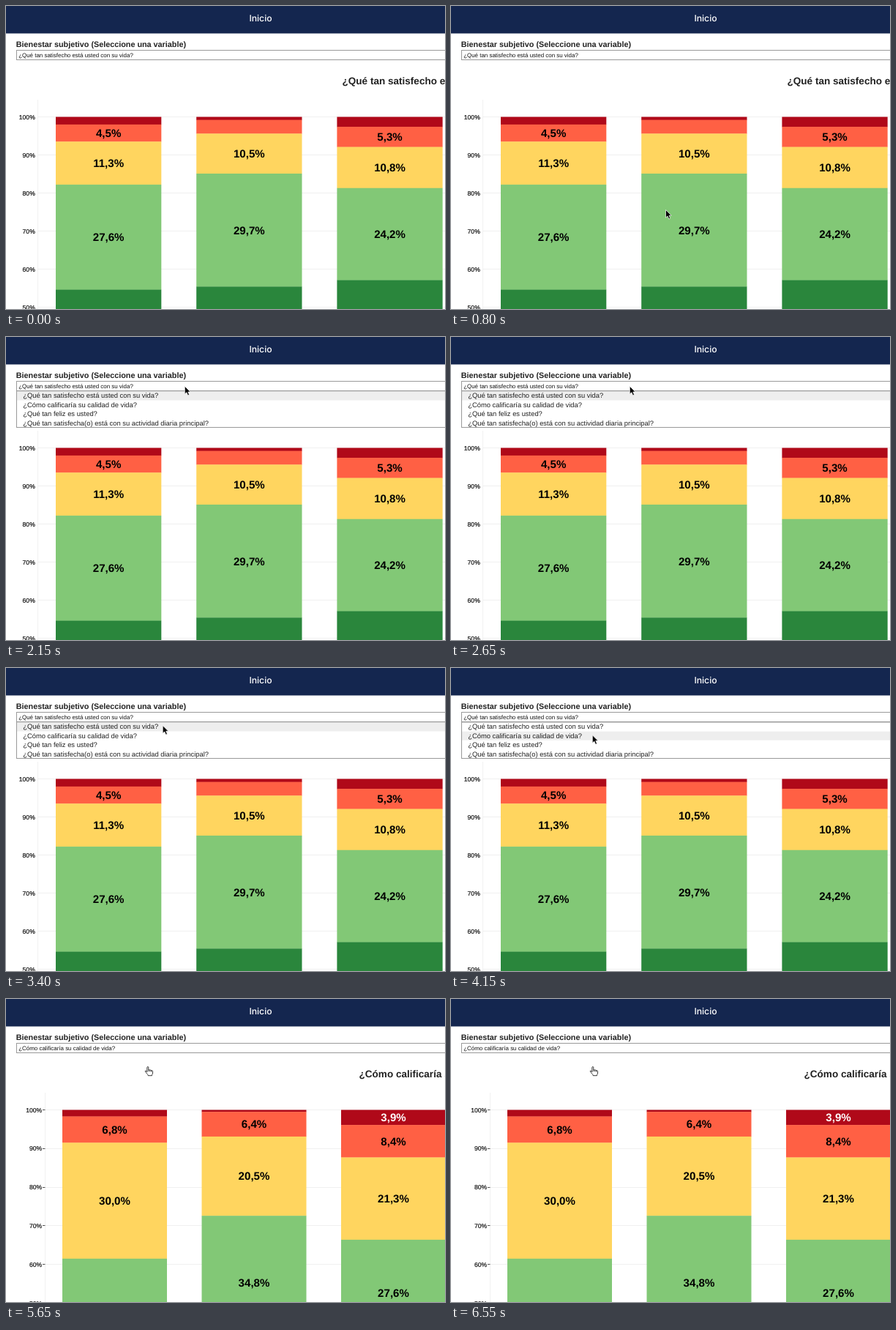
Animation of 600x414 px, one loop 6.6 s. Source, as an HTML page:

```html
<!DOCTYPE html>
<html lang="es">
<head>
<meta charset="utf-8">
<title>Bienestar subjetivo</title>
<style>
html, body { margin: 0; width: 100%; height: 100%; overflow: hidden; background: #fff; }
svg { display: block; width: 600px; height: 414px; }
text { font-family: "Liberation Sans", Arial, sans-serif; text-rendering: geometricPrecision; white-space: pre; }
.nav { font: 500 12.2px Inter, sans-serif; fill: #fff; text-anchor: middle; }
.head { font-size: 10.8px; font-weight: bold; fill: #222; }
.value { font-size: 7.95px; fill: #111; }
.option { font-size: 9.38px; fill: #222; }
.title { font-size: 13.55px; font-weight: bold; fill: #222; }
.axis { font-size: 8.6px; fill: #111; stroke: #111; stroke-width: .2px; text-anchor: end; }
.label { font-size: 15.1px; font-weight: bold; text-anchor: middle; }
</style>
</head>
<body>
<svg id="stage" viewBox="0 0 600 414"></svg>
<script>
const LOOP = 6600;
const HOVER = 1500, OPEN = 2150, NEXT_ROW = 3500, PICK = 4350, SWAP = 4900;
const TOP = 151.5;
const COLORS = ["#b00919", "#ff6044", "#ffd55f", "#82c876", "#2a863c"];
const QUESTIONS = [
  "¿Qué tan satisfecho está usted con su vida?",
  "¿Cómo calificaría su calidad de vida?",
  "¿Qué tan feliz es usted?",
  "¿Qué tan satisfecha(o) está con su actividad diaria principal?"
];
const CHARTS = [
  { title: QUESTIONS[0], titleX: 459.5, unit: 5.2, axisX: 43.5, labelX: 39.8, tick: 0,
    barX: 68, step: 192.2, width: 144.3,
    bars: [[2, 4.5, 11.3, 27.6], [.8, 3.6, 10.5, 29.7], [2.6, 5.3, 10.8, 24.2]] },
  { title: QUESTIONS[1], titleX: 482.5, unit: 5.28, axisX: 53.5, labelX: 49.2, tick: 3.5,
    barX: 77, step: 190.5, width: 143,
    bars: [[1.7, 6.8, 30, 46], [.5, 6.4, 20.5, 34.8], [3.9, 8.4, 21.3, 27.6]] }
];
// time, x, y of the pointer tip
const PATH = [
  [350, 330, 420], [1450, 241, 75], [1550, 237.5, 69.3], [2050, 244.3, 67.3],
  [2900, 244.3, 67.3], [3400, 214.3, 78.6], [3650, 193.3, 91.8]
];

const stage = document.getElementById("stage");

function add(parent, tag, attrs, content) {
  const node = document.createElementNS("http://www.w3.org/2000/svg", tag);
  for (const key in attrs) node.setAttribute(key, attrs[key]);
  if (content) node.textContent = content;
  parent.appendChild(node);
  return node;
}
const group = parent => add(parent, "g", {});
const rect = (parent, x, y, width, height, fill, extra) =>
  add(parent, "rect", { x, y, width, height, fill, ...extra });
const text = (parent, cls, x, y, content, fill) =>
  add(parent, "text", { class: cls, x, y, ...(fill && { fill }) }, content);

function drawChart(c) {
  const g = group(stage);
  text(g, "title", c.titleX, 106.8, c.title);
  rect(g, c.axisX - .5, 128, 1, 286, "#f1f1f1");
  for (let pct = 100; pct >= 50; pct -= 10) {
    const y = TOP + (100 - pct) * c.unit;
    rect(g, c.axisX, Math.floor(y), 600, 1, "#f0f0f0");
    if (c.tick) rect(g, c.axisX - c.tick, Math.floor(y), c.tick, 1, "#555");
    text(g, "axis", c.labelX, y + 3, pct + "%");
  }
  c.bars.forEach((values, i) => {
    const x = c.barX + i * c.step;
    let y = TOP;
    values.forEach((v, k) => {
      const h = v * c.unit;
      rect(g, x, y, c.width, h + .3, COLORS[k]);
      if (v >= 3.9) {
        text(g, "label", x + c.width / 2, y + h / 2 + 5.4,
          v.toFixed(1).replace(".", ",") + "%", k ? "#000" : "#fff");
      }
      y += h;
    });
    if (y < 414) rect(g, x, y, c.width, 414 - y, COLORS[4]);
  });
  return g;
}

const show = (node, on) => node.setAttribute("visibility", on ? "visible" : "hidden");

rect(stage, 0, 0, 600, 37.5, "#14264f");
text(stage, "nav", 348, 21, "Inicio");
text(stage, "head", 13.8, 56, "Bienestar subjetivo (Seleccione una variable)");
const charts = CHARTS.map(drawChart);

const box = rect(stage, 14.5, 60.5, 620, 13, "#fff", { stroke: "#999" });
const chosen = text(stage, "value", 17.2, 69.9, QUESTIONS[0]);

const menu = group(stage);
rect(menu, 14.5, 74, 620, 49.5, "#fff", { stroke: "#999" });
const mark = rect(menu, 15, 74.5, 620, 12, "#eee");
QUESTIONS.forEach((q, i) => text(menu, "option", 23.2, 83.4 + i * 12.4, q));

const arrow = add(stage, "path", {
  d: "M0 0V10.6L2.5 8.4L4.3 12.5L6.2 11.7L4.5 7.7H7.7Z",
  fill: "#000", stroke: "#fff", "stroke-width": .7
});
const hand = add(stage, "path", {
  d: "M3.3 7.8V1.8Q3.3.5 4.3.5T5.3 1.8V4.8Q6.6 4 7.2 5.2Q8.5 4.5 9.1 5.7Q11 5.3 11 7.2V9Q11 10.4 10 11.6V12.7H4.7V11.7Q3 10.3 1.8 8.4Q.2 6.6 1 6.1T3.3 7.8M5.3 4.8V7M7.2 5.2V7.2M9.1 5.7V7.5",
  fill: "#fff", stroke: "#222", "stroke-width": .9, "stroke-linejoin": "round",
  transform: "translate(189.5 92)"
});

function pointAt(t) {
  const i = PATH.findIndex(p => p[0] > t);
  if (i < 0) return PATH[PATH.length - 1].slice(1);
  if (i === 0) return PATH[0].slice(1);
  const [a, b] = [PATH[i - 1], PATH[i]];
  const k = (t - a[0]) / (b[0] - a[0]);
  return [a[1] + (b[1] - a[1]) * k, a[2] + (b[2] - a[2]) * k];
}

function render(t) {
  const swapped = t >= SWAP;
  show(charts[0], !swapped);
  show(charts[1], swapped);
  show(menu, t >= OPEN && t < PICK);
  mark.setAttribute("y", t < NEXT_ROW ? 74.5 : 86.7);
  box.setAttribute("stroke", t >= HOVER && t < OPEN ? "#444" : "#999");
  // the selection stays until the loop restarts
  const label = QUESTIONS[t >= PICK ? 1 : 0];
  if (chosen.textContent !== label) chosen.textContent = label;
  show(arrow, !swapped);
  show(hand, swapped);
  arrow.setAttribute("transform", `translate(${pointAt(t)})`);
}

const start = performance.now();
function tick() {
  render((performance.now() - start) % LOOP);
  requestAnimationFrame(tick);
}
render(0);
requestAnimationFrame(tick);
</script>
</body>
</html>
```
